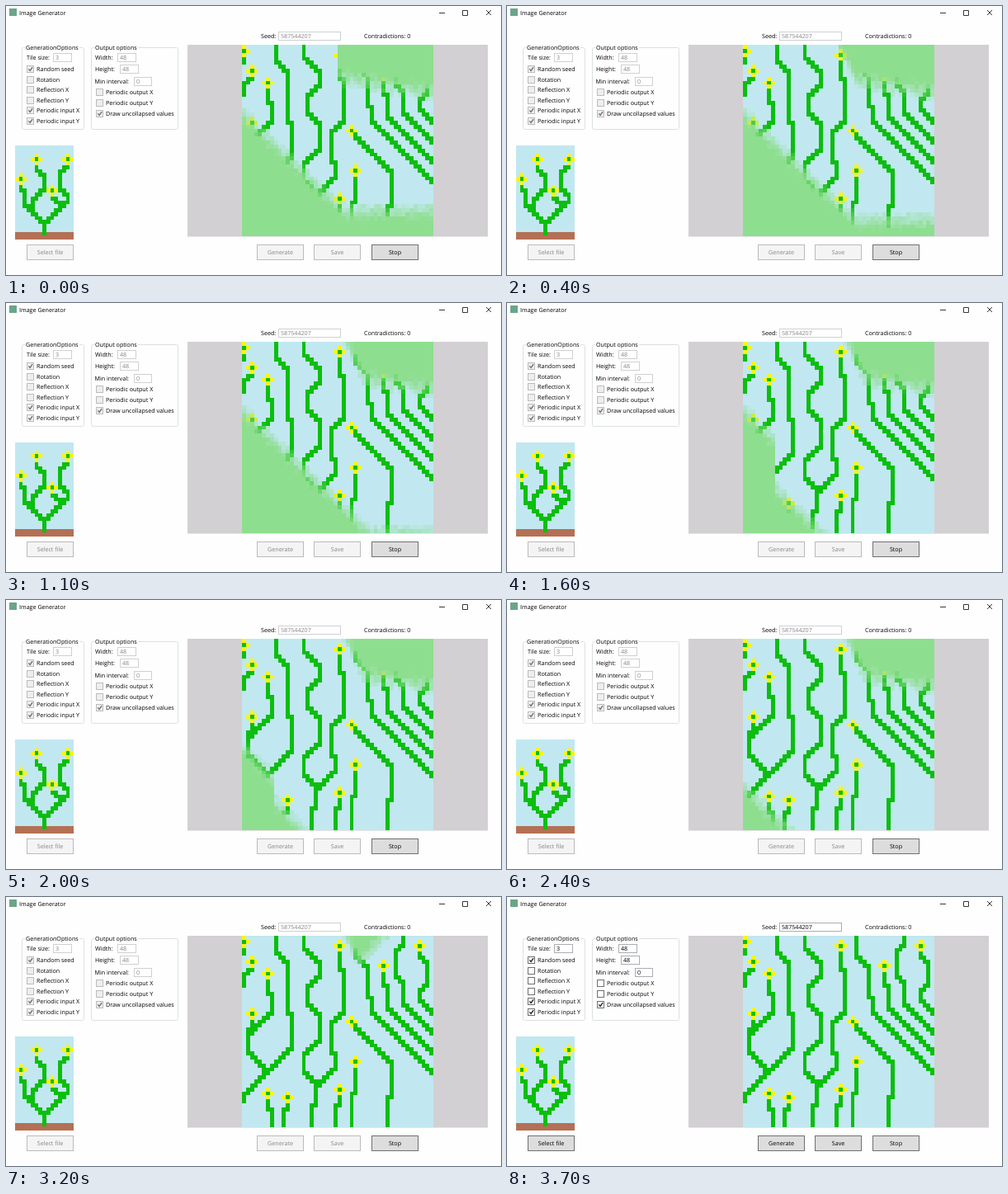
Animation, 600 px wide and 326 px high, one loop 3.8 s. Source, as an HTML page with a canvas:

```html
<!DOCTYPE html>
<html>
<head>
<meta charset="utf-8">
<title>Image Generator</title>
<style>
html, body { margin: 0; width: 100%; height: 100%; overflow: hidden; background: #fefefe; }
svg { position: absolute; left: 0; top: 0; font: 7.15px "Open Sans", "Noto Sans", sans-serif; text-rendering: geometricPrecision; }
canvas { position: absolute; image-rendering: pixelated; }
#out { left: 286px; top: 47px; width: 232.4px; height: 232.4px; }
#sample { left: 11px; top: 169px; width: 71px; height: 113.5px; }
.box { fill: #fff; stroke: #abadb3; }
.check { fill: #fff; stroke: #707070; }
.tick { fill: none; stroke: #212121; stroke-width: 1.4; }
.btn { fill: #ddd; stroke: #707070; }
.busy .lock .box { stroke: #cfd0d3; }
.busy .lock .check { fill: #eee; stroke: #bcbcbc; }
.busy .lock .tick { stroke: #707070; }
.busy .lock .btn { fill: #f4f4f4; stroke: #bdbabd; }
.busy .lock .val { fill: #858585; }
</style>
</head>
<body>
<svg id="ui" width="600" height="326"></svg>
<canvas id="sample" width="15" height="24"></canvas>
<canvas id="out" width="48" height="48"></canvas>
<script>
const ui = document.getElementById('ui');
const SKY = [193, 232, 240], STEM = [12, 190, 14], PETAL = [255, 245, 10],
  FOG = [142, 222, 143], SOIL = [180, 112, 84];

// ---- window ----
const text = (x, y, s, extra = '') => `<text x="${x}" y="${y}" ${extra}>${s}</text>`;
const rect = (x, y, w, h, extra) => `<rect x="${x}" y="${y}" width="${w}" height="${h}" ${extra}/>`;
const lock = s => `<g class="lock">${s}</g>`;
const field = (x, y, w, s) => lock(rect(x + .5, y + .5, w, 10, 'class="box"') +
  text(x + 3, y + 8.2, s, 'class="val"'));
const check = (x, y, s, on) => lock(rect(x + .5, y - 3.5, 8, 8, 'class="check"') +
  (on ? `<path class="tick" d="M${x + 2.3} ${y + .4}l1.8 2 3-4.3"/>` : '')) + text(x + 12, y + 3, s);
const button = (x, s) => rect(x + .5, 289.5, 56, 18, 'class="btn"') +
  text(x + 28.5, 301.2, s, 'class="val" text-anchor="middle"');
const group = (x, w, s, tw) => rect(x + .5, 50.5, w, 99, 'rx="2" fill="none" stroke="#dce0e2"') +
  rect(x + 4, 48, tw, 5, 'fill="#fefefe"') + text(x + 5, 53, s);

ui.innerHTML =
  rect(4, 3, 9, 9, 'fill="#6aa58a"') + text(16, 11, 'Image Generator') +
  '<path d="M525 8.5h7M553.5 5.5h6v6h-6zM582 5l6 6M588 5l-6 6" fill="none" stroke="#222" stroke-width=".9"/>' +
  group(19, 75, 'GenerationOptions', 66) + group(103, 105, 'Output options', 53) +
  text(25, 65, 'Tile size:') + field(57, 57, 22, '3') +
  ['Random seed', 'Rotation', 'Reflection X', 'Reflection Y', 'Periodic input X', 'Periodic input Y']
    .map((s, i) => check(25, 76 + Math.round(i * 12.6), s, i % 5 == 0 || i > 3)).join('') +
  text(108, 65, 'Width:') + field(135, 57, 22, '48') +
  text(108, 79.3, 'Height:') + field(138, 71, 22, '48') +
  text(107.5, 94, 'Min interval:') + field(155, 86, 21, '0') +
  ['Periodic output X', 'Periodic output Y', 'Draw uncollapsed values']
    .map((s, i) => check(109, 104 + 13 * i, s, i == 2)).join('') +
  text(309, 39.2, 'Seed:') + field(330, 31, 75, '587544207') + text(434, 39.2, 'Contradictions: 0') +
  rect(220, 47, 364, 232.5, 'fill="#d2d0d2"') +
  lock(button(25, 'Select file') + button(304, 'Generate') + button(373, 'Save')) + button(443, 'Stop');

// ---- plants: a few column,row points going down; * puts a flower on top ----
const samplePlants = ['*1,8 2,15 7,20', '*5,3 7,10 4,15', '*13,3 11,9 13,14 7,20 7,22', '*9,11 11,16'];
const plants = [
  '*0,1 0,4', '*2,6 0,12', '*6,9 7,19 1,25', '*2,19 1,28 5,34', '*6,39 7,47', '*11,40 10,47',
  '8,0 11,11 12,27 0,41', '15,0 19,9 16,14 19,22 15,33 18,38 17,47',
  '*24,2 25,14 22,26 23,32 18,38', '*24,38 23,47', '*28,31 27,47', '*27,21 37,33 36,47',
  '28,0 31,12 32,18 47,34', '*35,7 36,18 47,29', '40,0 38,5 40,17 47,24', '*44,2 46,9 44,16 47,19'];

// Between two points a stem drops straight, with one diagonal staircase halfway.
function grow(list, w, h) {
  const grid = Array.from({ length: h }, () => Array(w).fill(SKY));
  const set = (c, r, v) => { if (c >= 0 && c < w && r >= 0 && r < h) grid[r][c] = v; };
  for (const s of list) {
    const pts = s.replace('*', '').split(' ').map(p => p.split(',').map(Number));
    const [top, row] = pts[0];
    let c = top, r = row;
    for (const [c1, r1] of pts.slice(1)) {
      const bend = r + (r1 - r - Math.abs(c1 - c)) / 2;
      for (; r < r1; r++) {
        set(c, r, STEM);
        if (r >= bend && c != c1) set(c += Math.sign(c1 - c), r, STEM);
      }
      set(c, r, STEM);
    }
    if (s[0] == '*') for (const d of [-1, 1]) {
      set(top + d, row, PETAL);
      set(top, row + d, PETAL);
    }
  }
  return grid;
}

function paint(id, grid, shade = v => v) {
  const g = document.getElementById(id).getContext('2d'), w = grid[0].length;
  const img = g.createImageData(w, grid.length);
  grid.forEach((row, r) => row.forEach((v, c) => img.data.set([...shade(v, c, r), 255], (r * w + c) * 4)));
  g.putImageData(img, 0, 0);
}

const mix = (a, b, k) => a + (b - a) * k;
const ramp = (t, from, to) => Math.max(0, Math.min(1, (t - from) / (to - from)));
const noise = (c, r) => { const v = Math.sin(c * 127.1 + r * 311.7) * 43758.5; return v - Math.floor(v); };

// Top row of the lower fog: a slope that sinks, right part first, above a sinking floor.
function lowFog(c, t) {
  const first = c > 7 ? 12 * ramp(t, 1100, 1600) : 0;
  const sink = mix(first, 20, ramp(t, 1600, 2400)) + 14 * ramp(t, 2400, 2900);
  return Math.min(15 + .95 * c + sink, 39 + t / 180);
}

// Bottom row of the upper fog: eaten from the left, later from the right.
function highFog(c, t) {
  if (c < 24) return -1;
  const left = mix(18, 24.7, ramp(t, 0, 600));
  const right = 64 - 15 * ramp(t, 2400, 2900) - 24 * ramp(t, 2900, 3500);
  return Math.min(10 + (c - 24) / 6, 2 * (c - left), right - c);
}

const field48 = grow(plants, 48, 48);
const sample = grow(samplePlants, 15, 24);
for (const r of [22, 23]) sample[r] = sample[r].map(v => v == STEM ? v : SOIL);
paint('sample', sample);

function draw(t) {
  const done = t >= 3600;
  ui.classList.toggle('busy', !done);
  paint('out', field48, (v, c, r) => {
    const depth = Math.max(r - lowFog(c, t), highFog(c, t) - r);
    if (done || depth <= 0) return v;
    const a = ramp(depth / 4.5 + (noise(c, r) - .4) * .45, 0, 1);
    return v.map((x, i) => mix(x, FOG[i], a));
  });
}

let last = -1;
function tick(now) {
  const t = Math.floor(now % 3800 / 100) * 100;
  if (t != last) draw(last = t);
  requestAnimationFrame(tick);
}
draw(0);
requestAnimationFrame(tick);
</script>
</body>
</html>
```
